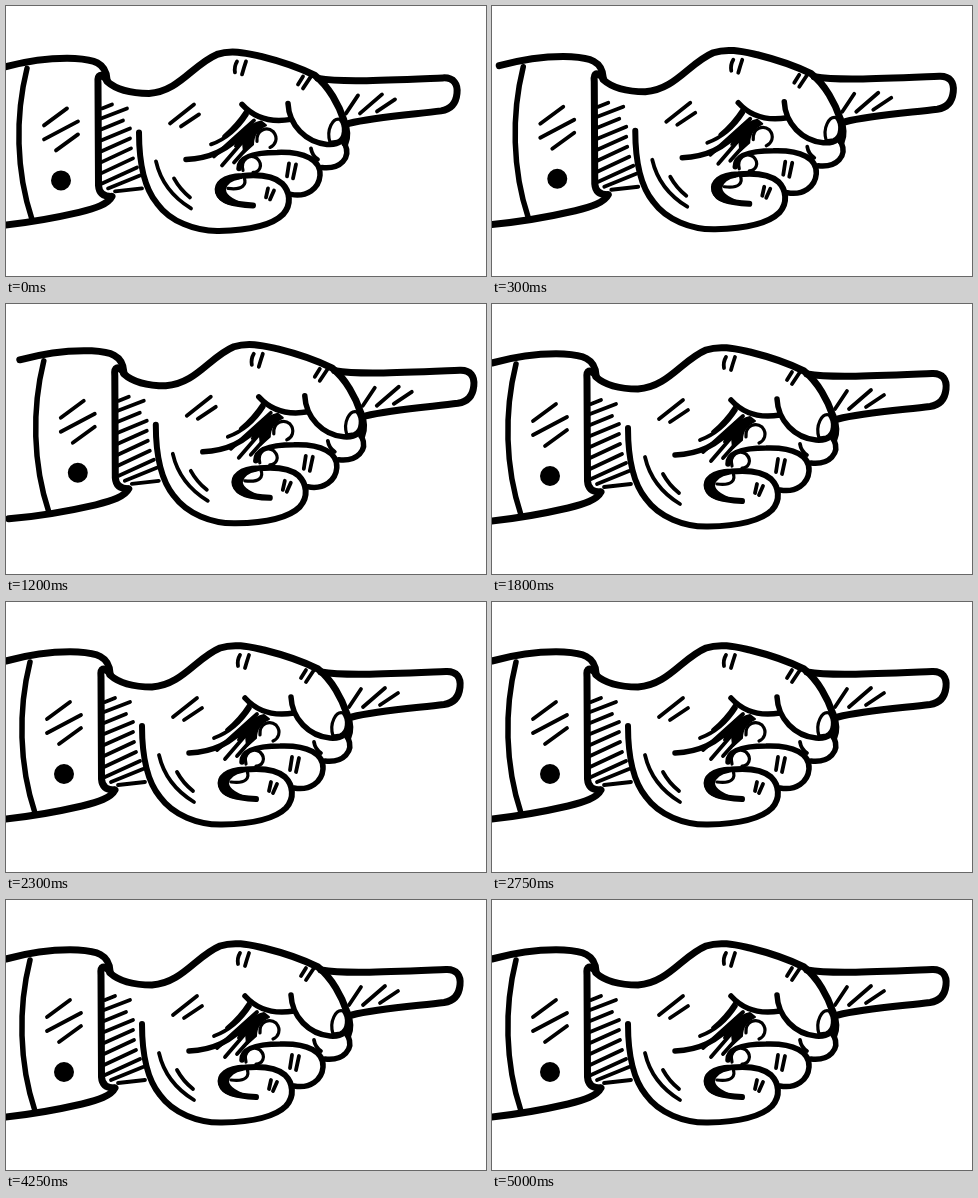
An HTML page that plays this animation: 480x270 px, repeating every 5.05 s.

```html
<!DOCTYPE html>
<html lang="en">
<head>
<meta charset="utf-8">
<title>Pointing hand</title>
<style>
  html, body { margin: 0; width: 100%; height: 100%; overflow: hidden; background: #fff; }
  svg { display: block; width: 100%; height: 100%; }
  #hand { fill: none; stroke: #000; stroke-linecap: round; stroke-linejoin: round; }
  .outline { stroke-width: 7; }
  .fold { stroke-width: 5.5; }
  .hatch { stroke-width: 3.8; }
  .nail { fill: #fff; stroke-width: 3.2; }
  .ink { fill: #000; stroke-width: 2; }
</style>
</head>
<body>
<svg viewBox="0 0 480 270">
  <g id="hand">
    <!-- sleeve and cuff -->
    <g class="outline">
      <path d="M0 59C22 53 47 49 72 50C90 51 103 54 104 71"/>
      <path d="M-11 218C25 215 50 210 76 204C92 200 105 196 109 188"/>
      <path d="M104 72C98 64 94 66 95 75L95.500 177C96 184 100 188 108 188"/>
    </g>
    <path class="fold" d="M24 60C12 108 13 163 29 211"/>
    <circle class="ink" cx="58" cy="172" r="9"/>
    <path class="hatch" d="M41 117L64 100M41 131L75 113M53 142L75 126"/>
    <path class="hatch" d="M99 100L109 96M98 110L124 100M98 121L120 112M98 132L127 120M98 143L127 130M98 154L128 140M98 165L130 150M99 175L134 159M105 180L137 167M112 183L139 180"/>

    <!-- back of the hand and index finger -->
    <g class="outline">
      <path d="M104 73C114 82 131 85 146 85C176 83 190 56 214 46C229 41 244 45 258 48C278 53 298 60 312 67C326 78 336 97 341 112C344 120 345 128 342 135"/>
      <path d="M315 70C338 74 378 72 440 69.500C451 69 455 76 454 85C453 95 448 101 438 102.500C410 106 370 109 346 115"/>
    </g>
    <path class="hatch" d="M343 105L355 87M357 105L379 86M374 103L392 91"/>
    <path class="hatch" d="M234 53Q231 58 232 64M243 53Q241 59 239 66M300 68L295 76M308 68L300 80"/>
    <path class="hatch" d="M167 115L191 96M178 118L196 106"/>

    <!-- palm shading -->
    <path class="fold" d="M183 151C205 150 225 143 244 120"/>
    <path class="hatch" d="M208 136Q230 128 244 106M221 128Q234 117 243 103M211 148L251 112M219 157L244 128M231 154L247 136"/>
    <path class="ink" d="M258 113C247 115 236 126 232 138L240 134L241 144L250 136C250 128 254 121 263 117Z"/>
    <path class="fold" d="M239 96C249 107 265 115 288 111"/>

    <!-- curled fingers -->
    <path class="fold" d="M285 95C286 117 303 134 324 136C336 137 343 132 343 121"/>
    <path class="nail" d="M327 134C323 121 330 109 337 111C342 117 342 130 334 133Z"/>
    <path class="fold" d="M342 136C348 149 338 161 319 159"/>
    <path class="hatch" d="M308 140Q309 147 315 151"/>
    <path class="nail" d="M254 133C253 121 264 118 270 123C276 130 272 137 267 139"/>
    <path class="fold" d="M236 160C236 148 253 144 274 144C302 143 318 152 317 167C316 180 304 189 288 186"/>
    <path class="nail" d="M240 162C237 151 247 145 254 150C261 157 256 164 250 164"/>
    <path class="hatch" d="M286 155L284 168M293 156L290 170"/>

    <!-- thumb and heel of the hand -->
    <path class="outline" d="M136 124C136 150 140 178 154 195C167 213 192 223 216 222.500C240 222 268 218 280 206C289 196 287 183 279 175C270 167 255 166 239 167.500C220 168 213 176 215 184C218 193 229 196 250 197" style="stroke-width:6"/>
    <path class="ink" d="M236 167C216 168 210 179 215 188C220 196 233 197 248 198C231 193 222 188 222 181C223 175 229 171 236 170Z"/>
    <path class="nail" d="M241 169C244 176 240 182 225 180"/>
    <path class="hatch" d="M265 180L263 189M271 182L267 191"/>
    <path class="hatch" d="M153 153C158 175 170 189 188 200M171 170Q177 181 187 189"/>
  </g>
</svg>
<script>
const LOOP = 5050, STEP = 50;
const hand = document.getElementById("hand");

// time, x offset, y offset: two forward nudges, then rest
const path = [
  [0, -3, 2.4], [380, 10, 0.3], [650, 6.5, -1.2],
  [1100, 10, -3], [1200, 13.8, -3.2], [1260, 15.2, -3.2],
  [1650, 0, 0], [LOOP, 0, 0]
];

function offsetAt(time) {
  const i = path.findIndex(key => key[0] > time);
  const [t0, x0, y0] = path[i - 1], [t1, x1, y1] = path[i];
  const u = (time - t0) / (t1 - t0);
  return [x0 + (x1 - x0) * u, y0 + (y1 - y0) * u];
}

const start = performance.now();
function draw() {
  const elapsed = (performance.now() - start) % LOOP;
  const [x, y] = offsetAt(Math.floor(elapsed / STEP) * STEP);
  hand.setAttribute("transform", `translate(${x} ${y})`);
  requestAnimationFrame(draw);
}
draw();
</script>
</body>
</html>
```
